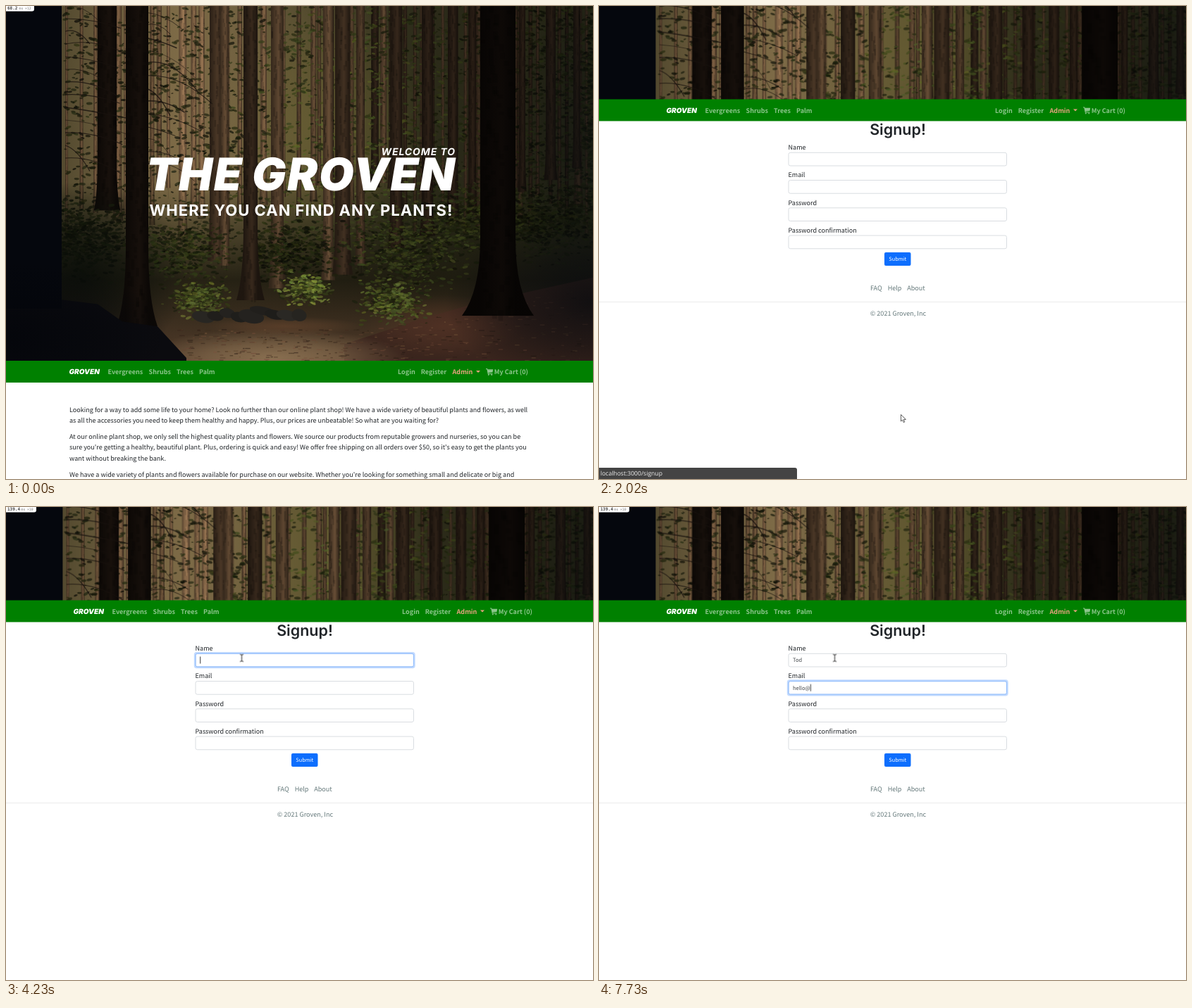
Write an HTML page with a canvas that moves like this. It is 833 by 672 pixels and loops after 8000 ms.

```html
<!DOCTYPE html>
<html lang="en">
<head>
<meta charset="utf-8">
<title>Plant shop</title>
<style>
html, body { margin: 0; width: 100%; height: 100%; overflow: hidden; background: #fff; }
canvas, svg { position: absolute; left: 0; top: 0; display: block; }
text { font: 9.05px "Noto Sans CJK JP", "Noto Sans CJK SC", "Noto Sans", sans-serif; fill: #212529; white-space: pre; text-rendering: geometricPrecision; }
.nav text { font-weight: 700; fill: #8cc68c; }
.nav .admin { fill: #e8a27f; }
.nav .brand { font: italic 900 10px Inter, sans-serif; fill: #fff; }
.hover { font-weight: 700; fill: #e2f1e2; }
.hero text { font-family: Inter, sans-serif; fill: #fff; }
.hero .big { font-size: 64px; font-weight: 900; font-style: italic; letter-spacing: 2px; }
.hero .small { font-size: 14px; font-weight: 700; font-style: italic; letter-spacing: .9px; }
.hero .sub { font-size: 22px; font-weight: 700; letter-spacing: 1px; }
.heading { font: 600 21.5px Inter, sans-serif; text-anchor: middle; }
.field { fill: #fff; stroke: #d5dade; stroke-width: .9; }
.glow { fill: none; stroke: #c2dafe; stroke-width: 2.6; }
.edge { fill: none; stroke: #86b7fe; stroke-width: .9; }
.typed { font-size: 7.5px; fill: #43474b; }
.submit { font-size: 7.4px; fill: #fff; text-anchor: middle; }
.foot { fill: #65797b; }
.badge path { fill: #fff; }
.badge text { font: 700 6px "DejaVu Sans Mono", monospace; fill: #444; }
.badge .dim { font-size: 4.8px; font-weight: 400; fill: #777; }
#status text { font: 8.6px "Open Sans", sans-serif; fill: #eee; }

/* pages and page parts: hard changes */
#home { animation: home 8s step-end infinite; }
#signup, #strip { animation: signup 8s step-end infinite; }
#hover { animation: hover 8s step-end infinite; }
#status { animation: status 8s step-end infinite; }
#badge { animation: badge 8s step-end infinite; }
@keyframes home { 0% { opacity: 1; } 25.25%, 100% { opacity: 0; } }
@keyframes signup { 0% { opacity: 0; } 25.25%, 100% { opacity: 1; } }
@keyframes hover { 0% { opacity: 0; } 14.125% { opacity: .55; } 16.25%, 100% { opacity: 1; } }
@keyframes status { 0% { opacity: 0; } 16.25% { opacity: .86; } 25.25% { opacity: .96; } 27.125% { opacity: .5; } 28.75%, 100% { opacity: 0; } }
@keyframes badge { 0% { opacity: 0; } 30.625%, 100% { opacity: 1; } }

#mouse { animation: mouse 8s step-end infinite; }
#arrow { animation: arrow 8s step-end infinite; }
#hand { animation: hand 8s step-end infinite; }
#beam { animation: beam 8s step-end infinite; }
#ring { animation: ring 8s step-end infinite; }
@keyframes mouse {
  0% { transform: translate(642px, 590px); }
  7.125% { transform: translate(642px, 590px); animation-timing-function: steps(3); }
  12.25% { transform: translate(608px, 533px); }
  14.125% { transform: translate(603px, 526px); }
  19.75% { transform: translate(588px, 540px); animation-timing-function: steps(2); }
  23.25%, 25.25% { transform: translate(428px, 580px); animation-timing-function: steps(2); }
  28.75% { transform: translate(429px, 553px); animation-timing-function: steps(3); }
  33.875% { transform: translate(350px, 249px); }
  35.75% { transform: translate(339px, 215.5px); }
  40.875%, 100% { transform: translate(334.5px, 214.5px); }
}
@keyframes arrow { 0%, 14.125% { opacity: 0; } 7.125%, 19.75% { opacity: 1; } 35.75%, 100% { opacity: 0; } }
@keyframes hand { 0% { opacity: 0; } 14.125% { opacity: 1; } 19.75%, 100% { opacity: 0; } }
@keyframes beam { 0% { opacity: 0; } 35.75%, 100% { opacity: 1; } }
@keyframes ring { 0% { opacity: 0; } 37.625% { opacity: .9; } 40.875%, 100% { opacity: 0; } }

/* form focus and carets */
#nameFocus { animation: nameFocus 8s linear infinite; }
#emailFocus { animation: emailFocus 8s linear infinite; }
#nameBlink { animation: nameBlink 8s step-end infinite; }
#emailBlink { animation: emailBlink 8s step-end infinite; }
@keyframes nameFocus { 0%, 37% { opacity: 0; } 40.875%, 69% { opacity: 1; } 71.5%, 100% { opacity: 0; } }
@keyframes emailFocus { 0%, 69% { opacity: 0; } 71.5%, 100% { opacity: 1; } }
@keyframes nameBlink { 0%, 46.25%, 58% { opacity: 0; } 37.625%, 52.875%, 63.125% { opacity: 1; } 69.875%, 100% { opacity: 0; } }
@keyframes emailBlink { 0% { opacity: 0; } 69.875%, 100% { opacity: 1; } }
</style>
</head>
<body>
<canvas id="forest" width="833" height="504"></canvas>
<canvas id="strip" width="833" height="133"></canvas>
<svg width="833" height="672" viewBox="0 0 833 672">
  <defs>
    <g id="nav" class="nav">
      <rect y="504" x="-10" width="860" height="31" fill="#008000"/>
      <text class="brand" x="89.5" y="523">GROVEN</text>
      <text x="144.5" y="523">Evergreens</text>
      <text x="202.5" y="523">Shrubs</text>
      <text x="242" y="523">Trees</text>
      <text x="274" y="523">Palm</text>
      <text x="556" y="523">Login</text>
      <text x="588.7" y="523">Register</text>
      <text class="admin" x="633.5" y="523">Admin</text>
      <path d="M667 518h6l-3 3z" fill="#e8a27f"/>
      <g fill="#8cc68c">
        <path d="M681 515h2.2l.4 1.2h7.6l-.7 4.3-6 .7.2.9h5.8v1h-6.7l-1.5-7H681z"/>
        <circle cx="684.8" cy="524" r=".9"/><circle cx="689.3" cy="524" r=".9"/>
      </g>
      <text x="692.7" y="523">My Cart (0)</text>
    </g>
  </defs>

  <g id="home">
    <rect y="535" width="833" height="137" fill="#fff"/>
    <g class="hero">
      <text class="small" x="532.5" y="212">WELCOME TO</text>
      <text class="big" x="199" y="262">THE</text>
      <text class="big" x="349" y="262">GROVEN</text>
      <text class="sub" x="203.5" y="298">WHERE YOU CAN FIND ANY PLANTS!</text>
    </g>
    <use href="#nav"/>
    <text id="hover" class="hover" x="588.7" y="523">Register</text>
    <text x="90" y="576.5">Looking for a way to add some life to your home? Look no further than our online plant shop! We have a wide variety of beautiful plants and flowers, as well</text>
    <text x="90" y="591.8">as all the accessories you need to keep them healthy and happy. Plus, our prices are unbeatable! So what are you waiting for?</text>
    <text x="90" y="615">At our online plant shop, we only sell the highest quality plants and flowers. We source our products from reputable growers and nurseries, so you can be</text>
    <text x="90" y="630.4">sure you're getting a healthy, beautiful plant. Plus, ordering is quick and easy! We offer free shipping on all orders over $50, so it's easy to get the plants you</text>
    <text x="90" y="645.8">want without breaking the bank.</text>
    <text x="90" y="668.7">We have a wide variety of plants and flowers available for purchase on our website. Whether you're looking for something small and delicate or big and</text>
    <g class="badge">
      <path d="M0 0H40V4.5a3 3 0 0 1-3 3H0z"/>
      <text x="2" y="5.3">68.2</text><text class="dim" x="18.5" y="5.3">ms</text><text class="dim" x="27" y="5.3">×12</text>
    </g>
  </g>

  <g id="signup">
    <rect y="133" width="833" height="539" fill="#fff"/>
    <use href="#nav" x="6" y="-371.5"/>
    <text class="heading" x="424" y="183">Signup!</text>
    <g id="form"></g>
    <rect x="405" y="350" width="37.5" height="19" rx="2" fill="#0d6efd"/>
    <text class="submit" x="423.8" y="362.1">Submit</text>
    <text class="foot" x="385" y="404">FAQ</text>
    <text class="foot" x="409.7" y="404">Help</text>
    <text class="foot" x="437.2" y="404">About</text>
    <rect y="420" width="833" height="1" fill="#ebebeb"/>
    <text class="foot" x="384.8" y="440">© 2021 Groven, Inc</text>
    <g id="badge" class="badge">
      <path d="M0 0H43V4.5a3 3 0 0 1-3 3H0z"/>
      <text x="2" y="5.3">139.4</text><text class="dim" x="21.5" y="5.3">ms</text><text class="dim" x="30" y="5.3">×10</text>
    </g>
  </g>

  <g id="status">
    <path d="M0 656H278a3 3 0 0 1 3 3V672H0z" fill="#3c3c3c"/>
    <text x="2" y="667">localhost:3000/signup</text>
  </g>

  <g id="mouse">
    <circle id="ring" cx="-.8" r="9.2" fill="#f8f05c"/>
    <path id="arrow" d="M.5 .5V10l2.2-2 1.5 3.6 1.6-.7L4.3 7.4h3.1z" fill="#fff" stroke="#333" stroke-width=".8"/>
    <path id="hand" d="M3.2 1c.9 0 1.1.6 1.1 1.2v3l3.3.7c.8.2 1.2.7 1.1 1.5l-.6 4.1H3.7L.6 8c-.4-.7.6-1.2 1.5-.2V2.2C2.1 1.6 2.3 1 3.2 1z" fill="#fff" stroke="#333" stroke-width=".8"/>
    <path id="beam" d="M-2.500-5q2 0 2.500.8.500-.8 2.500-.8M0-4.200V4.200M-2.500 5q2 0 2.500-.8.500.8 2.500.8" fill="none" stroke="#222"/>
  </g>
</svg>
<script>
// ---- form ----
const LOOP = 8000;
const box = (cls, grow = 0) =>
  `<rect class="${cls}" x="${269 - grow}" y="${8.3 - grow}" width="${309.5 + 2 * grow}" height="${18.7 + 2 * grow}" rx="2.5"/>`;

document.getElementById('form').innerHTML =
  ['Name', 'Email', 'Password', 'Password confirmation'].map((label, i) => {
    const id = label.toLowerCase();
    const live = i > 1 ? '' : `
      <g id="${id}Focus">${box('glow', .9)}${box('edge')}</g>
      <text id="${id}" class="typed" x="275" y="20.3"></text>
      <g id="${id}Blink"><rect id="${id}Caret" x="275.3" y="12.5" width=".9" height="10" fill="#222"/></g>`;
    return `<g transform="translate(0 ${200 + i * 39.25})"><text x="268.5" y="4">${label}</text>${box('field')}${live}</g>`;
  }).join('');

// Letters appear at an even pace and push the caret ahead of them.
function type(id, word, start, end) {
  const field = document.getElementById(id);
  field.innerHTML = [...word].map((ch, i) => `<tspan id="${id}${i}">${ch}</tspan>`).join('');
  let css = '', caret = '0%{transform:none}';
  [...word].forEach((ch, i) => {
    const at = (start + (end - start) * i / (word.length - 1)) * 100 / LOOP + '%';
    css += `@keyframes ${id}${i}{0%{fill-opacity:0}${at},100%{fill-opacity:1}}
      #${id}${i}{animation:${id}${i} ${LOOP}ms step-end infinite}`;
    caret += `${at}{transform:translateX(${field.getSubStringLength(0, i + 1)}px)}`;
  });
  caret += `100%{transform:translateX(${field.getComputedTextLength()}px)}`;
  css += `@keyframes ${id}Caret{${caret}}#${id}Caret{animation:${id}Caret ${LOOP}ms step-end infinite}`;
  const sheet = document.createElement('style');
  sheet.textContent = css;
  document.head.append(sheet);
}
type('name', 'Tod', 5050, 5460);
type('email', 'hello@', 6800, 7730);

// ---- forest picture ----
const forest = document.getElementById('forest');
const W = forest.width, H = forest.height;
const g = forest.getContext('2d');
let seed = 29;
const rnd = () => (seed = (seed * 16807) % 2147483647) / 2147483647;
const spread = r => (rnd() + rnd() + rnd() - 1.5) / 1.5 * r;
// Warm light between the trees, strongest left of the middle.
const sun = x => Math.exp(-(((x - 250) / 210) ** 2));

function haze(x, y, rx, ry, rgb, a) {
  g.save();
  g.translate(x, y);
  g.scale(rx, ry);
  const fade = g.createRadialGradient(0, 0, 0, 0, 0, 1);
  fade.addColorStop(0, `rgba(${rgb},${a})`);
  fade.addColorStop(.5, `rgba(${rgb},${a * .6})`);
  fade.addColorStop(1, `rgba(${rgb},0)`);
  g.fillStyle = fade;
  g.fillRect(-1, -1, 2, 2);
  g.restore();
}

function leaf(x, y, light, size = 1.5 + rnd() * 3) {
  g.fillStyle = `hsla(${72 + spread(14)},${34 + rnd() * 16}%,${light * (.3 + rnd() * 1.2)}%,.7)`;
  g.beginPath();
  g.ellipse(x, y, size, size * .45, spread(.9), 0, 7);
  g.fill();
}

function bush(x, y, r, light) {
  for (let i = 0; i < r * 9; i++) leaf(x + spread(r * 1.3), y + spread(r * .8), light);
}

function trunk(x, w, base, light, flare = w * .2) {
  const tone = k => `hsl(${32 - 100 / (light + 6)},${34 - light * .1}%,${light * k}%)`;
  const shade = g.createLinearGradient(x, 0, x + w, 0);
  shade.addColorStop(0, tone(.6));
  shade.addColorStop(.6, tone(1.1));
  shade.addColorStop(1, tone(.55));
  g.fillStyle = shade;
  g.beginPath();
  g.moveTo(x, 0);
  g.lineTo(x + w, 0);
  g.lineTo(x + w, base * .75);
  g.quadraticCurveTo(x + w, base * .92, x + w + flare, base);
  g.lineTo(x - flare, base);
  g.quadraticCurveTo(x, base * .92, x, base * .75);
  g.fill();
  g.fillStyle = 'rgba(0,0,0,.17)';
  for (let y = 0; y < base; y += 6) g.fillRect(x + rnd() * w * .85, y, w * .13, 4 + rnd() * 12);
}

function ground(color, ...points) {
  g.fillStyle = color;
  g.beginPath();
  g.moveTo(points[0][0], H);
  points.forEach(([x, y]) => g.lineTo(x, y + spread(3)));
  g.lineTo(points.at(-1)[0], H);
  g.fill();
}

function paintForest() {
  const back = g.createLinearGradient(0, 0, W, 0);
  for (let i = 0; i <= 10; i++) {
    const s = sun(i * W / 10);
    back.addColorStop(i / 10, `rgb(${38 + 88 * s},${38 + 69 * s},${22 + 49 * s})`);
  }
  g.fillStyle = back;
  g.fillRect(0, 0, W, H);
  haze(450, 170, 150, 190, '122,112,55', .5);

  // far trunks, then the canopy, thicker to the right
  for (let x = 84; x < W; x += 9 + rnd() * 14) {
    trunk(x, 4 + rnd() * 7, 250 + rnd() * 90, 15 + 24 * sun(x) + spread(9));
  }
  for (let i = 0; i < 5200; i++) {
    const x = W * (1 - rnd() ** 1.5 * .9), y = rnd() * 330;
    leaf(x, y, 8 + 12 * Math.exp(-(((x - 470) / 150) ** 2)) * (.6 + y / 500));
  }

  // forest floor
  const floor = g.createLinearGradient(0, 250, 0, H);
  floor.addColorStop(0, 'rgba(24,27,13,0)');
  floor.addColorStop(.55, 'rgba(29,26,15,.9)');
  floor.addColorStop(1, '#533c2b');
  g.fillStyle = floor;
  g.fillRect(0, 250, W, H);
  ground('#3a251d', [480, 480], [585, 446], [660, 424], [W, 385]);
  haze(380, 500, 190, 42, '142,116,84', .9);
  haze(395, 455, 110, 14, '104,70,46', .6);
  haze(620, 455, 110, 45, '92,56,40', .6);

  // middle trunks as [left edge, width]
  const trees = [[130, 27], [289, 18], [304, 12], [376, 18], [450, 14], [467, 21], [497, 12],
    [545, 17], [590, 16], [627, 14], [656, 11], [728, 9], [766, 14], [805, 10]];
  trees.forEach(([x, w]) => trunk(x, w, 412 - Math.abs(x - 400) * .45, (9 + 18 * Math.exp(-(((x - 380) / 150) ** 2))) * Math.min(1.2, 17 / w)));

  // undergrowth as [x, y, radius, light]
  [[110, 330, 85, 8], [250, 350, 70, 13], [400, 350, 70, 9], [570, 345, 95, 14], [670, 300, 75, 12],
    [770, 310, 85, 7], [275, 415, 42, 22], [425, 402, 36, 29], [550, 420, 48, 22]].forEach(b => bush(...b));

  // litter and stones
  for (let i = 0; i < 500; i++) {
    const x = 230 + rnd() * 603, y = H - rnd() * (45 + Math.max(0, x - 520) * .23);
    g.fillStyle = `hsla(${16 + rnd() * 16},35%,${8 + rnd() * 28}%,.5)`;
    g.fillRect(x, y, 2 + rnd() * 6, 1.4);
  }
  for (let i = 0; i < 9; i++) {
    g.fillStyle = `hsl(40,8%,${10 + rnd() * 6}%)`;
    g.beginPath();
    g.ellipse(280 + i * 17, 438 + spread(9), 9 + rnd() * 11, 5 + rnd() * 5, .2, 0, 7);
    g.fill();
  }

  // bare branches
  g.strokeStyle = 'rgba(24,18,14,.8)';
  for (let i = 0; i < 26; i++) {
    const y = i * 9, x = i % 2 ? 198 : 84, d = 30 + rnd() * 70;
    g.lineWidth = .6 + rnd();
    g.beginPath();
    g.moveTo(x, y);
    g.quadraticCurveTo(x + d * .5, y + spread(14), x + d, y + 12 + rnd() * 30);
    g.stroke();
  }

  // near trunks and dark edges
  haze(110, 380, 150, 130, '8,12,8', .85);
  haze(W, 420, 210, 120, '8,10,14', .8);
  haze(W, 200, 120, 260, '8,12,14', .45);
  trunk(337, 20, 418, 15, 10);
  trunk(170, 32, 455, 6, 13);
  trunk(673, 50, 440, 3.5, 26);
  ground('#0b0b0f', [0, 408], [75, 416], [130, 424], [165, 448], [215, 456], [256, 500]);
  g.fillStyle = '#05070d';
  g.fillRect(0, 0, 79, 430);
  haze(0, 470, 230, 110, '3,5,10', .8);
}
paintForest();

document.getElementById('strip').getContext('2d').drawImage(forest, 0, -110, 848, 513);
</script>
</body>
</html>
```
